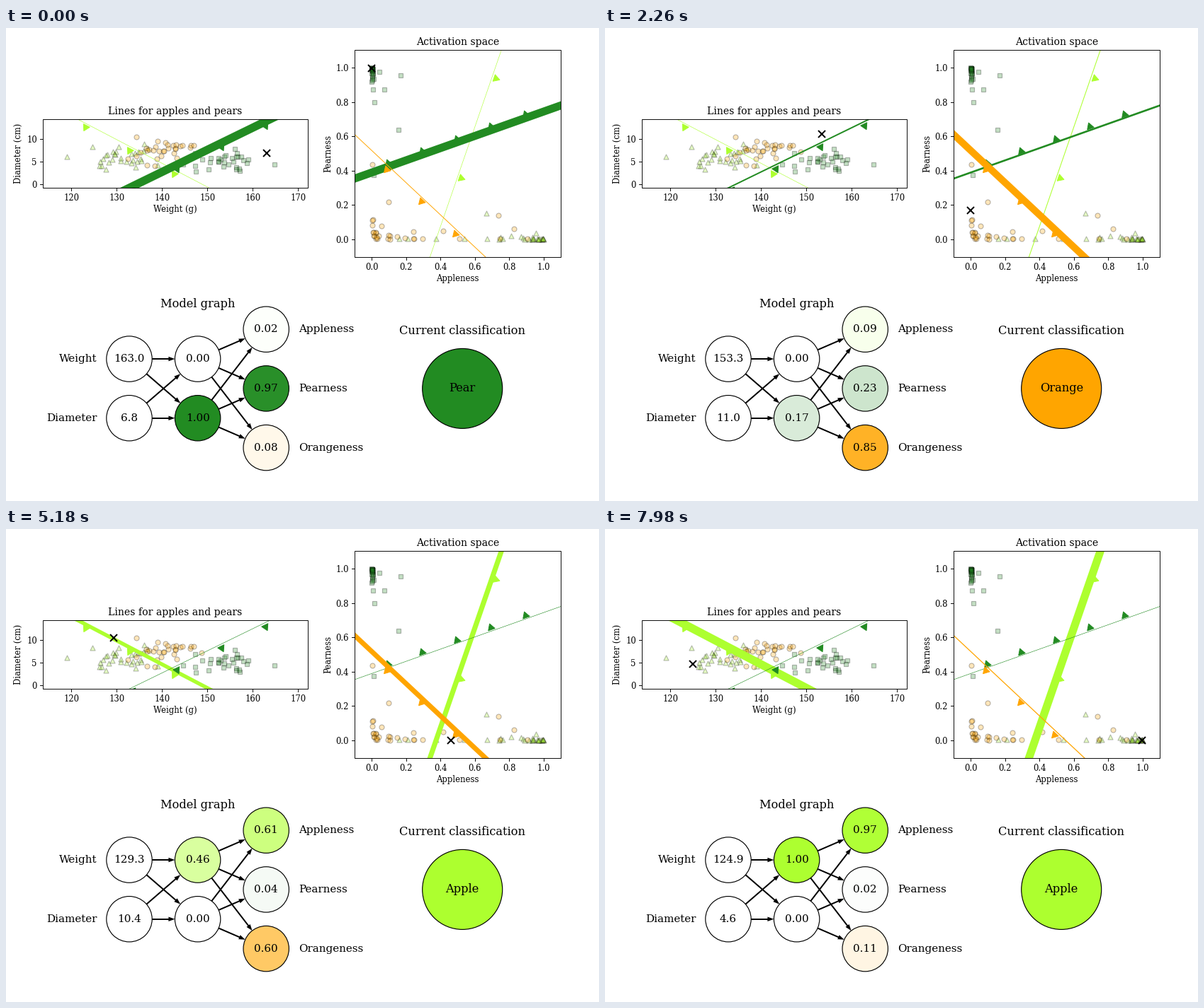
Recreate the animation shown at these times as a matplotlib script. Size 837 px wide and 669 px high, loop 8 s.

```python
import numpy as np
import matplotlib.pyplot as plt
from matplotlib.animation import FuncAnimation
from matplotlib.patches import Circle, Polygon, Rectangle

W, H, DPI = 837, 669, 72          # at 72 dpi one unit of size is one pixel
PT = 83.7 / 72                    # pixels per layout point
SMALL, TITLE, NODE, HEAD = 10 * PT, 12 * PT, 13 * PT, 14 * PT
THIN = 0.8 * PT
STEP_DEG = 1.2016

plt.rcParams["font.family"] = "DejaVu Serif"

GREEN_YELLOW, FOREST, ORANGE = np.array(
    [[173, 255, 47], [34, 139, 34], [255, 165, 0]]) / 255
COLORS = [GREEN_YELLOW, FOREST, ORANGE]
NAMES = ["Apple", "Pear", "Orange"]

# Two-layer perceptron: weights and biases
W1 = np.array([[-0.4, -0.764], [0.423, -0.8655]])
B1 = np.array([0.4 * 148.73, -0.423 * 134.5])
W2 = np.array([[5.37, -1.85], [-1.99, 5.6], [-4.72, -5.03]])
B2 = np.array([-2.01, -2.18, 2.6])


def layer(x, w, b):
    return 1 / (1 + np.exp(-(np.asarray(x) @ w.T + b)))


rng = np.random.default_rng(12)


def cluster(mean, spread, n=32):
    """Random (weight, diameter) samples with exact mean and spread."""
    z = rng.normal(size=(n, 2))
    return mean + (z - z.mean(0)) / z.std(0) * spread


fig = plt.figure(figsize=(W / DPI, H / DPI), dpi=DPI, facecolor="white")
ax = fig.add_axes([0, 0, 1, 1])
ax.set(xlim=(0, W), ylim=(H, 0))
ax.axis("off")


def text(x, y, s, size, ha="center", va="center", **kw):
    return ax.text(x, y, s, fontsize=size, ha=ha, va=va, zorder=6, **kw)


class Plot:
    """A framed plot with equal scale on both axes."""

    def __init__(self, box, origin, base, scale):
        self.box, self.origin, self.base, self.scale = box, origin, base, scale
        x0, y0, x1, y1 = box
        self.frame = Rectangle((x0, y0), x1 - x0, y1 - y0, fill=False,
                               ec="black", lw=THIN, zorder=4)
        ax.add_patch(self.frame)

    def px(self, p):
        d = (np.asarray(p, float) - self.base) * self.scale
        return np.array(self.origin) + d * [1, -1]

    def decorate(self, title, xlabel, ylabel, xticks, yticks, fmt, ylabel_x):
        x0, y0, x1, y1 = self.box
        size, pad = 3.5 * PT, 7 * PT
        tick = dict(color="black", lw=THIN, zorder=4)
        for v in xticks:
            x = self.px((v, 0))[0]
            ax.plot([x, x], [y1, y1 + size], **tick)
            text(x, y1 + pad, fmt % v, SMALL, va="top")
        for v in yticks:
            y = self.px((0, v))[1]
            ax.plot([x0 - size, x0], [y, y], **tick)
            text(x0 - pad, y, fmt % v, SMALL, "right", "center_baseline")
        mid = (x0 + x1) / 2
        text(mid, y0 - 6 * PT, title, TITLE, va="baseline")
        text(mid, y1 + 24, xlabel, SMALL, va="top")
        text(ylabel_x, (y0 + y1) / 2, ylabel, SMALL, va="bottom",
             rotation=90, rotation_mode="anchor")

    def scatter(self, pts, color, marker, size):
        x, y = self.px(pts).T
        ax.scatter(x, y, s=size ** 2, marker=marker, color=[color],
                   edgecolors="black", linewidths=PT, alpha=0.27, zorder=1)

    def boundary(self, w, b, color):
        """Line w.x + b = 0 with triangles on its positive side."""
        x0, _, x1, _ = self.box
        lim = self.base[0] + (np.array([x0, x1]) - self.origin[0]) / self.scale
        xs = np.linspace(*lim, 7)
        pts = self.px(np.column_stack([xs, -(b + w[0] * xs) / w[1]]))
        n = w / np.hypot(*w)
        tips = pts[1:-1] + 5 * n * [1, -1]
        turn = np.degrees(np.arctan2(n[1], n[0])) - 90
        d = pts[-1] - pts[0]
        ends = np.array([pts[0] - 0.2 * d, pts[-1] + 0.2 * d])
        line, = ax.plot(*ends.T, color=color, zorder=2)
        marks, = ax.plot(*tips.T, ls="", marker=(3, 0, turn), ms=10 * PT,
                         color=color, mec=color, mew=THIN, zorder=2)
        for a in (line, marks):
            a.set_clip_path(self.frame)
        return line

    def cross(self):
        return ax.plot([], [], "x", color="black", ms=9.6, mew=2, zorder=5)[0]


inputs = Plot((52, 129, 426, 226), (92.4, 220.7), (120, 0), 6.4)
inputs.decorate("Lines for apples and pears", "Weight (g)", "Diameter (cm)",
                range(120, 171, 10), (0, 5, 10), "%d", 24.4)
space = Plot((492, 31, 783, 324), (516.4, 298.65), (0, 0), 242.3)
fifths = np.arange(6) / 5
space.decorate("Activation space", "Appleness", "Pearness",
               fifths, fifths, "%.1f", 461)

fruits = [(cluster((130.9, 5.9), (4.2, 1.4)), "^", 7),
          (cluster((154.0, 5.0), (4.1, 1.2)), "s", 5.4),
          (cluster((140.4, 7.5), (3.9, 1.4)), "o", 7)]
for (pts, marker, size), color in zip(fruits, COLORS):
    inputs.scatter(pts, color, marker, size)
    space.scatter(layer(pts, W1, B1), color, marker, size)

lines = [inputs.boundary(w, b, c) for w, b, c in zip(W1, B1, COLORS)]
lines += [space.boundary(w, b, c) for w, b, c in zip(W2, B2, COLORS)]
crosses = [inputs.cross(), space.cross()]

# Model graph: columns of evenly spaced nodes around one middle height
R, GAP_X, GAP_Y, MID = 32.2, 96.6, 83.7, 509.9


def column(k, n):
    top = MID - GAP_Y * (0.5 if n == 2 else 1)
    return [(174 + GAP_X * k, top + GAP_Y * j) for j in range(n)]


def arrow(p, q):
    p, q = np.array(p, float), np.array(q, float)
    u = (q - p) / np.hypot(*(q - p))
    side = np.array([-u[1], u[0]])
    start, tip = p + R * u, q - R * u
    back = tip - 9 * u
    ax.plot(*np.array([start, back + u]).T, color="black", lw=2,
            solid_capstyle="butt", zorder=2)
    ax.add_patch(Polygon([tip, back + 3.2 * side, back - 3.2 * side],
                         fc="black", lw=0, zorder=2))


def node(p, r=R, size=NODE):
    disc = Circle(p, r, fc="white", ec="black", lw=PT, zorder=3)
    ax.add_patch(disc)
    return disc, text(*p, "", size)


columns = [column(k, n) for k, n in enumerate((2, 2, 3))]
for left, right in zip(columns, columns[1:]):
    for p in left:
        for q in right:
            arrow(p, q)
nodes = [node(p) for col in columns for p in col]

text(columns[1][0][0], 390.5, "Model graph", HEAD)
for (x, y), s in zip(columns[0], ("Weight", "Diameter")):
    text(x - 45.3, y, s, NODE, "right")
for (x, y), s in zip(columns[2], ("Appleness", "Pearness", "Orangeness")):
    text(x + 45.8, y, s, NODE, "left")
text(644.3, 428.6, "Current classification", HEAD)
result, result_text = node((644.2, MID), 56.5, HEAD)


def draw(i):
    # steps are held for 20, 100 and 20 ms in turn
    cycle, phase = divmod(20 * i, 140)
    a = np.radians(STEP_DEG * (3 * cycle + (phase >= 20) + (phase >= 120)))
    x = np.array([143 + 20 * np.cos(a), 6.76 + 5 * np.sin(a)])
    hidden = layer(x, W1, B1)
    out = layer(hidden, W2, B2)

    for mark, pos in zip(crosses, (inputs.px(x), space.px(hidden))):
        mark.set_data([pos[0]], [pos[1]])
    acts = [*hidden, *out]
    for line, v in zip(lines, acts):
        line.set_linewidth(max(0.5, 10 * v) * PT)

    for (_, label), v in zip(nodes, x):
        label.set_text(f"{v:.1f}")
    for (disc, label), v, c in zip(nodes[2:], acts, COLORS[:2] + COLORS):
        disc.set_facecolor(1 - v * (1 - c))
        label.set_text(f"{v:.2f}")

    best = int(np.argmax(out))
    result.set_facecolor(COLORS[best])
    result_text.set_text(NAMES[best])
    return []


anim = FuncAnimation(fig, draw, frames=400, interval=20, repeat=True)
plt.show()
```
